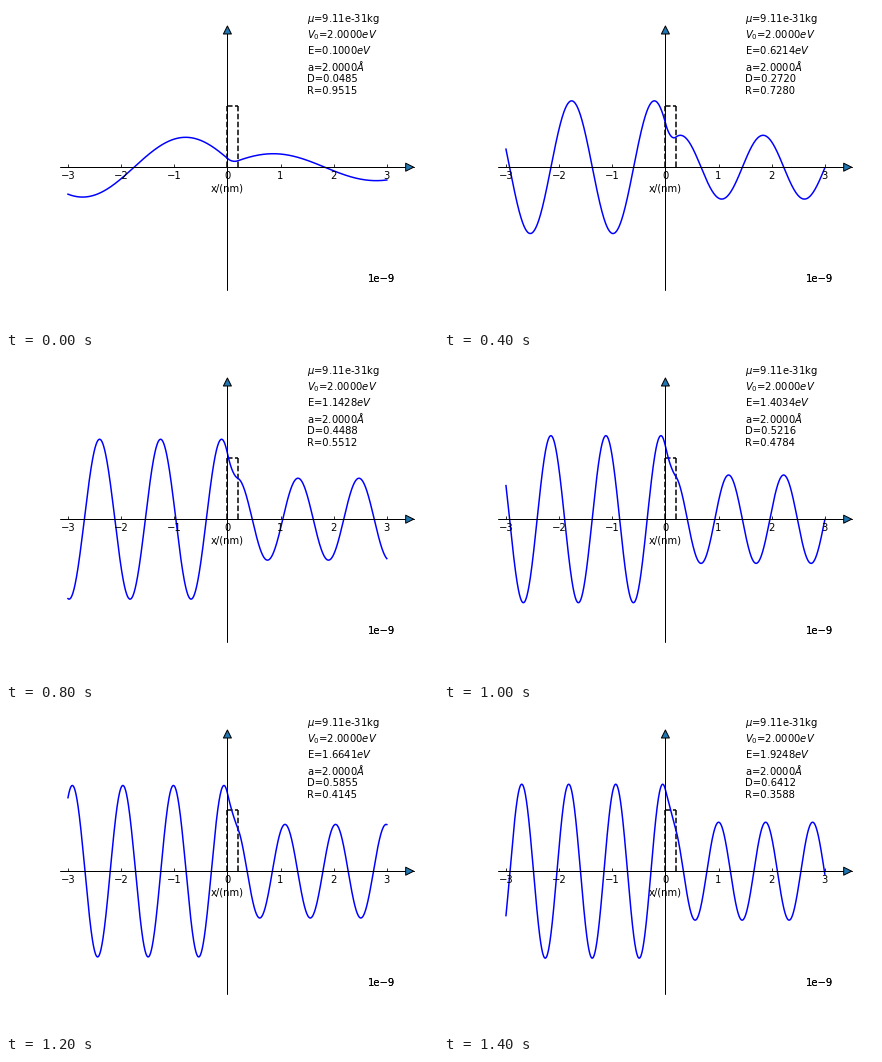
These frames come from a looping animation (432 px wide and 324 px high, 1450 ms). A matplotlib script:

```python
import numpy as np
import matplotlib.pyplot as plt
from matplotlib.animation import FuncAnimation
from mpl_toolkits import axisartist

# Electron tunnelling through a rectangular barrier (lengths in nm, energies in eV)
HBAR, MASS, CHARGE = 1.055e-34, 9.11e-31, 1.6021e-19
C = HBAR**2 / (2 * MASS * CHARGE) * 1e18
V0, A = 2.0, 0.2
FRAMES, INTERVAL = 29, 50
energies = np.linspace(0.1, 1.99, FRAMES + 1)
x = np.linspace(-3, 3, 1201)


def solve(energy):
    """Return the real part of the wave and the transmission probability."""
    k = np.sqrt(energy / C)
    q = np.sqrt((V0 - energy) / C)
    ch, sh = np.cosh(q * A), np.sinh(q * A)
    end = 1 / (ch + 0.5j * (q / k - k / q) * sh)
    r = end * (ch - 1j * k / q * sh) - 1

    left = np.exp(1j * k * x) + r * np.exp(-1j * k * x)
    d = np.clip(x, 0, A) - A
    inside = end * (np.cosh(q * d) + 1j * k / q * np.sinh(q * d))
    right = end * np.exp(1j * k * (x - A))
    psi = np.where(x < 0, left, np.where(x <= A, inside, right))
    return psi.real, abs(end) ** 2


def add_axis(name, coord):
    axis = ax.axis[name] = ax.new_floating_axis(coord, 0)
    axis.set_axisline_style("-|>", size=2.0)
    axis.line.set_facecolor("C0")
    return axis


fig = plt.figure(figsize=(6, 4.5), dpi=72)
fig.subplots_adjust(left=0.125, right=0.9, bottom=0.125, top=0.88)
ax = fig.add_subplot(axes_class=axisartist.Axes)
ax.set_xlim(-3.15, 3.15)
ax.set_ylim(-2, 2)
ax.set_xticks(range(-3, 4))

ax.axis[:].set_visible(False)
add_axis("x", 0).label.set_text("x/(nm)")
add_axis("y", 1).toggle(ticks=False, ticklabels=False)

for xs, ys in (([0, 0], [0, 1]), ([A, A], [0, 1]), ([0, A], [1, 1])):
    ax.plot(xs, ys, "k--", lw=1.5)
wave, = ax.plot([], [], "b", lw=1.5)
info = ax.text(1.5, 1.2, "")

# The scale factor is overprinted, which makes it look heavier
for _ in range(2):
    fig.text(0.9, 48 / 324, "1e\u22129", ha="right")


def update(i):
    energy = energies[i]
    psi, d = solve(energy)
    wave.set_data(x, psi)
    info.set_text("\n".join([
        r"$\mu$=9.11e-31kg",
        f"$V_0$={V0:.4f}$eV$",
        f"E={energy:.4f}$eV$",
        f"a={A * 10:.4f}$\u00c5$",
        f"D={d:.4f}",
        f"R={1 - d:.4f}",
    ]))
    return wave, info


anim = FuncAnimation(fig, update, frames=FRAMES, interval=INTERVAL, repeat=True)
plt.show()
```
